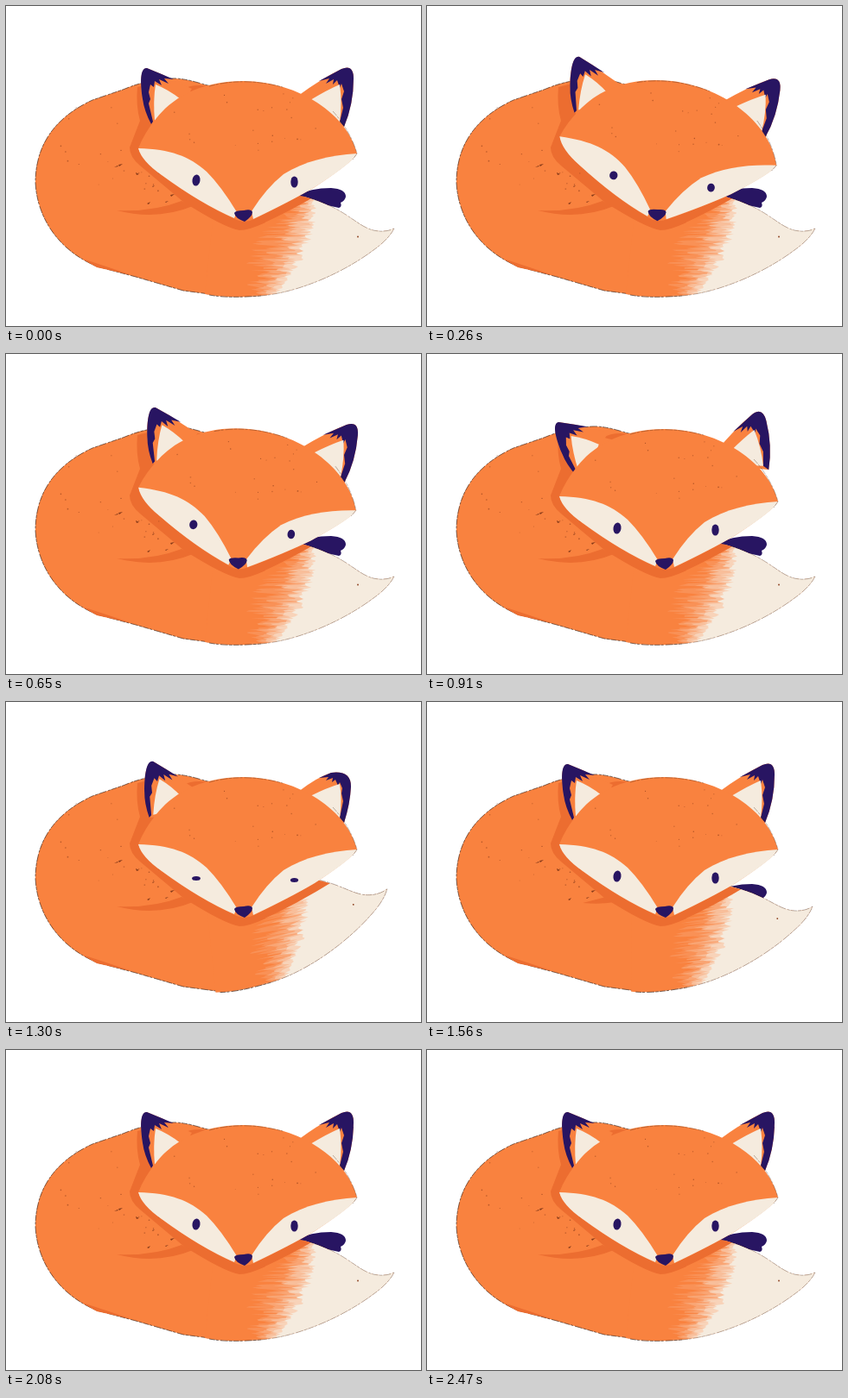
Write an HTML page that moves like this. It is 480 px wide and 371 px high and loops after 2600 ms.

```html
<!DOCTYPE html>
<html lang="en">
<head>
<meta charset="utf-8">
<title>Resting fox</title>
<style>
  html, body { margin: 0; width: 100%; height: 100%; overflow: hidden; background: #fff; }
  svg { display: block; width: 100vw; height: 100vh; }
  .fur { fill: #f9823f; }
  .shade { fill: #ec6d30; }
  .cream { fill: #f5ebde; }
  .navy { fill: #281562; }
  .ink { fill: none; stroke: #3a2015; stroke-width: .8; stroke-dasharray: 7 1 3 2 9 1 4 1; opacity: .8; }
  .faint { opacity: .4; }
  .speck { fill: #8a3c1a; }
</style>
</head>
<body>
<svg viewBox="0 0 480 371">
  <defs>
    <clipPath id="tailClip"><use href="#tailShape"/></clipPath>
    <clipPath id="movedTailClip"><use href="#tailShape" id="movedTail"/></clipPath>
  </defs>

  <path class="navy" id="paw" d="M335 220Q352 211 376 211Q393 212 393 221Q392 226 387 228Q389 233 385 234L376 232L345 225Z"/>

  <g id="body">
    <path class="fur" d="M237 93C222 89 206 83 190 84C160 87 150 91 135 97L100 109C72 122 34 148 34 205C36 245 60 283 105 302L150 314L205 330L250 336L275 310L300 250V150Z"/>
    <path class="ink" d="M237 93C222 89 206 83 190 84C160 87 150 91 135 97L100 109C72 122 34 148 34 205C36 245 60 283 105 302L150 314L205 330L250 336"/>
    <path class="shade" d="M88 293Q110 300 146 312L105 303Z"/>
  </g>

  <g id="tail">
    <path class="fur" id="tailShape" d="M230 334C250 338 270 338 295 336C340 332 392 308 425 283Q442 271 449 258Q438 263 425 260C405 255 395 236 345 221L300 215L240 240Z"/>
    <g clip-path="url(#tailClip)" class="cream" id="brush"></g>
    <path class="ink" d="M235 335C250 338 270 338 295 336"/>
    <path class="ink faint" d="M295 336C340 332 392 308 425 283Q442 271 449 258Q438 263 425 260C405 255 395 236 352 223"/>
    <circle class="speck" cx="407" cy="267.500" r=".9"/>
  </g>

  <path class="shade" id="crease" d="M128 237Q170 239 203 226L216 232Q175 249 128 237Z"/>
  <path class="shade" id="shortCrease" d="M180 233L207 226L217 232Q200 235 180 233Z"/>
  <path class="shade" d="M152 94L172 89L172 130L260 200L300 215L300 251Q281 260 270 260Q252 257 205 227L155 185Q143 175 143 164L155 133Q150 115 152 94Z"/>
  <path class="shade" clip-path="url(#movedTailClip)" d="M295 215L378 200L380 207Q335 235 295 253Z"/>
  <path class="shade" d="M205 97Q213 90 237 93L225 102Z"/>
  <g class="speck" id="bodySpecks"></g>

  <g id="head">
    <g id="leftEar">
      <path class="fur" d="M168 137L158 110C155 90 155 72 163 72L180 79L196 87L215 96L192 132Z"/>
      <path class="navy" d="M168 137Q160 122 158 108C155 88 155 71 163 72L180 79L194 85L183 84L188 90L177 85L180 92L172 87L171 94L167 91L165 100L167 108L165 113L170 134Z"/>
      <path class="cream" d="M173 91Q188 97 202 108L190 126L172 133Q170 110 173 91Z"/>
    </g>
    <g id="rightEar">
      <path class="fur" d="M338 104Q365 84 388 73Q402 67 402 84Q402 114 391 140L365 130Z"/>
      <path class="navy" d="M362 87L388 73Q402 67 402 84Q402 114 391 140L386 134L390 118L388 108L391 99L388 90L386 95L383 86L378 91L379 85L370 90L374 84Z"/>
      <path class="cream" d="M352 109Q372 97 386 91Q389 112 386 134L365 128Z"/>
    </g>
    <g id="foldedEar">
      <path class="fur" d="M338 104Q360 87 376 82Q399 79 399 98Q398 118 391 140L365 130Z"/>
      <path class="navy" d="M362 88L376 82Q399 79 399 98Q398 118 391 140L386 134L390 115L388 106L389 100L386 93L384 97L381 90L377 93L378 88L370 91L373 87Z"/>
      <path class="cream" d="M352 109Q372 99 386 95Q389 112 386 134L365 128Z"/>
    </g>
    <path class="fur" d="M153 165Q160 147 174 130C190 110 220 87 275 87C340 88 395 126 406 171Q402 180 357 210Q330 226 287 247Q275 253 263 246Q225 229 180 196Q158 180 153 165Z"/>
    <path class="cream" d="M153 165C190 166 212 174 232 192Q249 209 267 239L264 246Q225 229 180 196Q157 180 153 165Z"/>
    <path class="cream" d="M406 171C374 173 345 180 321 195Q301 211 284 238L286 247Q330 226 357 210Q402 181 406 171Z"/>
    <path class="ink faint" d="M235 93Q275 82 320 94M378 122Q398 144 406 171L401 178"/>
    <g class="speck" id="headSpecks"></g>
    <path class="navy" d="M264 240Q265 237 275 237Q284 235 285 239Q285 244 276 250Q265 246 264 240Z"/>
    <ellipse class="navy" id="leftEye" cx="220"/>
    <ellipse class="navy" id="rightEye" cx="333.500"/>
  </g>
</svg>

<script>
const STEP = 130, STEPS = 20;
const $ = id => document.getElementById(id);
const set = (id, attrs) => {
  for (const key in attrs) $(id).setAttribute(key, attrs[key]);
};
const show = (id, visible) => set(id, { opacity: visible ? 1 : 0 });

let seed = 11;
const random = () => (seed = seed * 16807 % 2147483647) / 2147483647;
const between = (a, b) => a + (b - a) * random();

// Left limit of the solid cream on the tail tip.
const creamEdge = y => 355 - 47 * ((y - 220) / 117) ** 2;

// Ragged layer of paint whose edge lies `reach` pixels left of the solid cream.
function brushLayer(reach, rough, opacity) {
  let d = 'M460 215';
  for (let y = 218; y < 340; y += 1.2) {
    const spread = 0.35 + 0.65 * Math.sin(Math.PI * (y - 218) / 125);
    d += `L${creamEdge(y) - spread * (reach + between(-rough, rough))} ${y}`;
  }
  return `<path opacity="${opacity}" d="${d}L460 340Z"/>`;
}

function paintBrush() {
  $('brush').innerHTML = brushLayer(38, 22, 0.14) + brushLayer(27, 18, 0.22)
    + brushLayer(15, 15, 0.35) + brushLayer(6, 11, 0.45) + brushLayer(-2, 6, 1);
}

function paintSpecks(id, count, cx, cy, rx, ry) {
  let dots = '';
  for (let i = 0; i < count; i++) {
    const a = between(0, 2 * Math.PI), r = Math.sqrt(random());
    dots += `<circle cx="${cx + rx * r * Math.cos(a)}" cy="${cy + ry * r * Math.sin(a)}" r="${between(0.4, 0.9)}" opacity="${between(0.3, 0.7)}"/>`;
  }
  $(id).innerHTML += dots;
}

paintBrush();
$('bodySpecks').innerHTML = '<path d="M125 187l4-2 1 1zM130 184l5-1-4 3zM150 193l4 2-3 1zM115 191l3-1zM163 229l4-2-2 3zM190 219l5-1-4 3zM184 227l4-1-3 2zM169 209l3-1-2 2z"/>';
paintSpecks('bodySpecks', 14, 110, 160, 55, 50);
paintSpecks('bodySpecks', 8, 165, 210, 30, 20);
paintSpecks('headSpecks', 24, 280, 135, 95, 38);

// Values by step; steps beyond the listed keys stay at rest.
const tilts = { 1: 0.33, 2: 0.67, 3: 1, 4: 1, 5: 0.5 };
const lifts = { 8: 0.33, 9: 0.67, 10: 1, 11: 0.75, 12: 0.5, 13: 0.25 };
const blinks = { 9: 0.5, 10: 1, 11: 0.5 };
const at = (track, step) => track[step] || 0;

function render(time) {
  const step = Math.floor(time / STEP) % STEPS;
  const tilt = at(tilts, step), lift = at(lifts, step);
  const shut = Math.max(at(blinks, step), 0.6 * tilt);
  const flick = step >= 7 && step <= 11 ? (step % 2 ? 1 : -1) : 0;

  set('head', { transform: `translate(${-tilt}) rotate(${9.3 * tilt} 279.5 168)` });
  const leftTurn = flick > 0 ? -13.5 : flick < 0 ? 8.5 : 5 * tilt;
  set('leftEar', { transform: `rotate(${leftTurn} 187 120)` });
  set('rightEar', { transform: `translate(${-2 * tilt}) rotate(${flick * -14} 370 120)` });
  show('rightEar', flick >= 0);
  show('foldedEar', flick < 0);

  const rx = 4.5 + 0.4 * shut, ry = 6.6 - 4.1 * shut, drop = 2.5 * shut;
  set('leftEye', { rx, ry, cy: 202 + drop, transform: `rotate(${8 * (1 - shut)} 220 202)` });
  set('rightEye', { rx: rx - 0.3, ry, cy: 204 + drop });

  const tailTurn = `rotate(${-12 * lift} 249 276)`;
  set('tail', { transform: tailTurn });
  set('movedTail', { transform: tailTurn });
  show('paw', lift < 0.9);
  const folded = lift > 0.1 && lift < 0.9;
  show('crease', !folded);
  show('shortCrease', folded);
}

const start = performance.now();
function tick() {
  render(performance.now() - start);
  requestAnimationFrame(tick);
}
tick();
</script>
</body>
</html>
```
